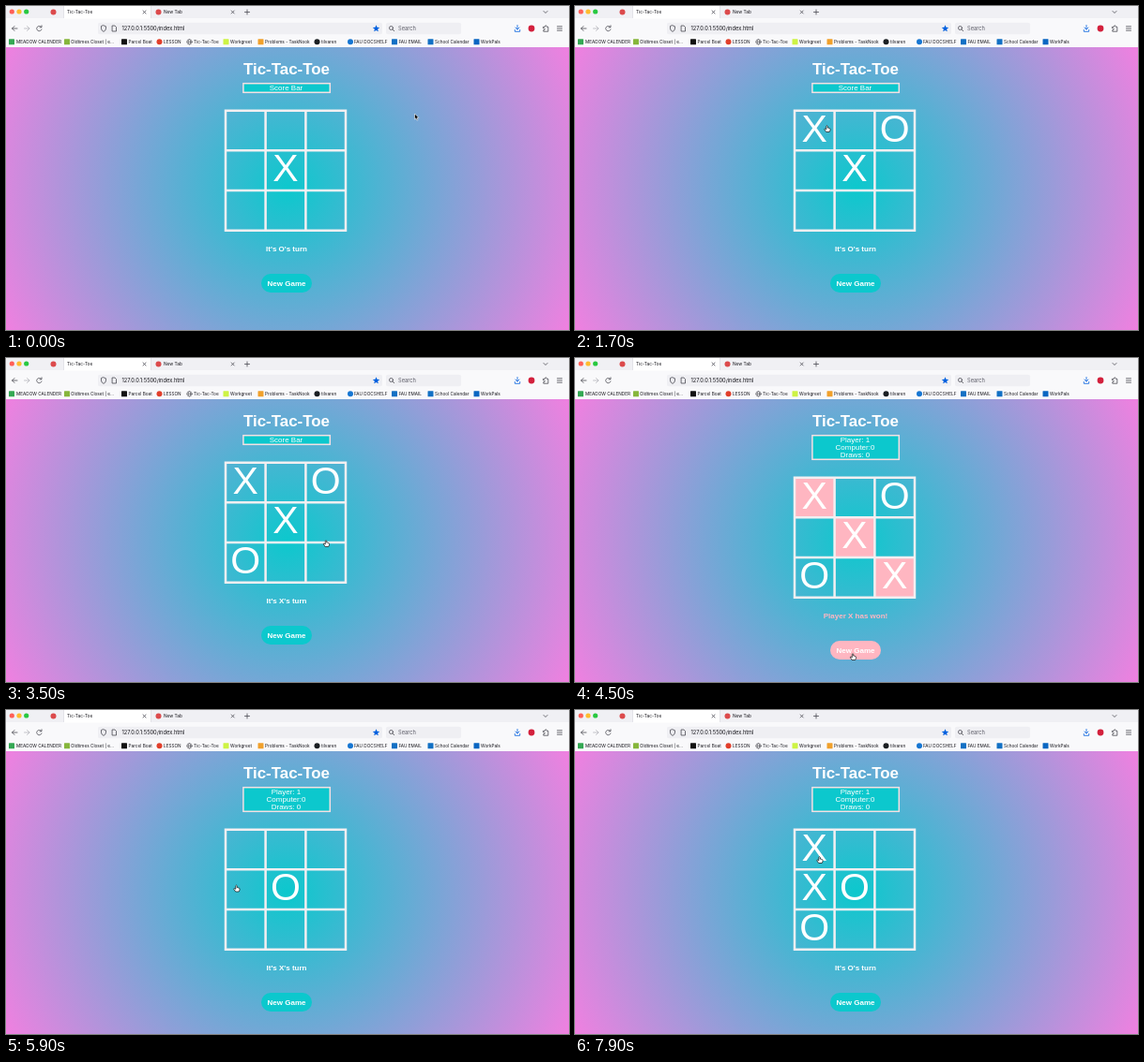
These frames come from a looping animation (600x346 px, 8 s). An HTML page:

```html
<!DOCTYPE html>
<html lang="en">
<head>
<meta charset="utf-8">
<title>Tic-Tac-Toe</title>
<style>
  html, body { margin: 0; width: 100%; height: 100%; overflow: hidden; }
  svg { display: block; width: 600px; height: 346px; }
  .ui { font-family: Inter, "Noto Sans", sans-serif; fill: #15141a; }
  .page { font-family: "Liberation Sans", Arial, sans-serif; fill: #fff; text-anchor: middle; }
  .bold { font-weight: 700; }
  .icon { fill: none; stroke: #4a4a52; stroke-width: .8; stroke-linecap: round; stroke-linejoin: round; }
  .mark { font-size: 41px; }
  .small { font-size: 8px; }
</style>
</head>
<body>
<svg viewBox="0 0 600 346">
  <defs>
    <radialGradient id="glow" gradientUnits="userSpaceOnUse" cx="300" cy="195" r="336">
      <stop offset="0" stop-color="#0cc8cd"/>
      <stop offset="1" stop-color="#f080e0"/>
    </radialGradient>
  </defs>

  <rect width="600" height="346" fill="url(#glow)"/>

  <!-- browser window -->
  <g class="ui">
    <rect width="600" height="13" fill="#f0f0f4"/>
    <rect y="13" width="600" height="31" fill="#f9f9fb"/>
    <rect x="61.5" y="0" width="93" height="13.5" fill="#fff"/>
    <path d="M61.5 0v13M154.5 0v13" stroke="#d5d5dc" stroke-width=".6"/>
    <circle cx="6.3" cy="6" r="2.6" fill="#ff5f57"/>
    <circle cx="14" cy="6" r="2.6" fill="#febc2e"/>
    <circle cx="21.7" cy="6" r="2.6" fill="#28c840"/>
    <circle cx="50.5" cy="6.5" r="3" fill="#dc4a4c"/>
    <circle cx="162.5" cy="6.5" r="3" fill="#dc4a4c"/>
    <g font-size="4.8">
      <text x="65" y="8.4">Tic-Tac-Toe</text>
      <text x="168" y="8.4">New Tab</text>
    </g>
    <g class="icon">
      <path d="M146 5l3 3m0-3l-3 3M240.200 5l3 3m0-3l-3 3M254.500 6.500h5m-2.500-2.500v5M573 5.500l2 2 2-2"/>
      <path d="M12 24H6.500m2.500-2.500L6.500 24l2.500 2.500"/>
      <path d="M19.500 24H25m-2.500-2.500L25 24l-2.500 2.500" stroke="#b4b4bb"/>
      <path d="M37.500 22.300A2.700 2.700 0 1 0 38 25M38 20.800v2h-2"/>
    </g>
    <g fill="#efeff3">
      <rect x="98" y="17.800" width="303" height="12.400" rx="2"/>
      <rect x="405" y="17.800" width="80" height="12.400" rx="2"/>
    </g>
    <g class="icon">
      <path d="M104 20.800l2.500 1v2.300q0 2-2.500 3.300-2.500-1.300-2.500-3.300v-2.300z"/>
      <path d="M113.500 21h2.500l1.500 1.500V27h-4z"/>
      <circle cx="410.500" cy="23.500" r="2"/>
      <path d="M412 25l1.700 1.700"/>
      <path d="M545 20.500v4.500m-2-2l2 2 2-2M542.300 25.500v1.800h5.400v-1.800" stroke="#0060df"/>
      <path d="M572.800 22.300h1.500q0-1.500 1-1.500t1 1.500h1.500v4.900h-5v-1.500q1.500 0 1.500-1t-1.500-1z"/>
      <path d="M587.500 21.800h5m-5 2.200h5m-5 2.200h5"/>
    </g>
    <path id="star" fill="#0060df"/>
    <circle cx="560" cy="24" r="3.400" fill="#d3203c"/>
    <text x="123.500" y="26.200" font-size="5.700">127.0.0.1:5500/index.html</text>
    <text x="418" y="26.200" font-size="5.700" fill="#5b5b66">Search</text>
    <g id="links" font-size="4.700"></g>
    <g class="icon" style="stroke-width:.55">
      <circle cx="195.500" cy="38.300" r="2.700"/>
      <ellipse cx="195.500" cy="38.300" rx="1.200" ry="2.700"/>
      <path d="M192.800 38.300h5.400"/>
    </g>
  </g>

  <!-- game -->
  <g class="page">
    <text class="bold" x="299" y="73.400" font-size="16.900">Tic-Tac-Toe</text>
    <rect id="bar" x="252.900" y="82.700" width="92.400" fill="#0cc8cd" stroke="#f5dfe2" stroke-width="1.500"/>
    <g id="score" class="small"></g>
    <g id="game">
      <g id="cells"></g>
      <path d="M234 111.700h128v128h-128zM276.600 111.700v128M319.400 111.700v128M234 154.300h128M234 197h128" fill="none" stroke="#f3eff1" stroke-width="2.500"/>
      <g id="marks"></g>
      <text id="status" class="bold small" x="299" y="261.600"></text>
      <rect id="button" x="272" y="286" width="54" height="20" rx="10"/>
      <text class="bold small" x="299" y="298.700">New Game</text>
    </g>
  </g>

  <g id="pointer" stroke-linejoin="round">
    <path id="arrow" d="M0 0v6l1.400-1.200 1 2.300 1.100-.5-1-2.200h1.900z" fill="#000" stroke="#fff" stroke-width=".6"/>
    <path id="hand" d="M-.7.700Q0-.5.700.700V2.600q1.200-.3 1.500.4 1.300-.1 1.300 1V5.200L2.700 7H-.8L-2.500 4.600q-.5-1.200.5-1.100l1.300.8z" fill="#fff" stroke="#111" stroke-width=".7"/>
  </g>
</svg>

<script>
const LOOP = 8000, STEP = 100;
const PINK = '#ffb6c1', TEAL = '#0cc8cd';
const NS = 'http://www.w3.org/2000/svg';
const $ = id => document.getElementById(id);

function add(parent, tag, attrs, text = '') {
  const el = document.createElementNS(NS, tag);
  for (const key in attrs) el.setAttribute(key, attrs[key]);
  el.textContent = text;
  parent.append(el);
  return el;
}

const starPoints = Array.from({ length: 10 }, (_, i) => {
  const r = i % 2 ? 1.7 : 3.9, a = i * Math.PI / 5;
  return `${394.5 + r * Math.sin(a)} ${24.2 - r * Math.cos(a)}`;
});
$('star').setAttribute('d', `M${starPoints.join('L')}z`);

// icon centre, text start, label, icon colour, round icon
const links = [
  [6, 11, 'MEADOW CALENDER', '#34a853'],
  [65, 69, 'Oldtimes Closet | e…', '#86b63c'],
  [126, 130.5, 'Parcel Boat', '#111'],
  [163.500, 168, 'LESSON', '#e13f2b', true],
  [195.500, 200, 'Tic-Tac-Toe'],
  [234.500, 239, 'Workgreet', '#cdf344'],
  [271.500, 276, 'Problems - TaskNook', '#f0a02c'],
  [331.500, 336, 'tilvaren', '#1b1f23', true],
  [367, 371, 'FAU DOCSHELF', '#1676d2', true],
  [414, 418.500, 'FAU EMAIL', '#1270c4'],
  [452.500, 457, 'School Calendar', '#1270c4'],
  [501.500, 506, 'WorkPals', '#0a66c2']
];
for (const [cx, x, label, fill, round] of links) {
  if (fill) add($('links'), 'rect', { x: cx - 3, y: 35.3, width: 6, height: 6, rx: round ? 3 : .5, fill });
  add($('links'), 'text', { x, y: 40 }, label);
}

const cells = [], marks = [];
for (let i = 0; i < 9; i++) {
  const col = i % 3, row = Math.floor(i / 3);
  cells.push(add($('cells'), 'rect', { x: 234 + col * 42.7, y: 111.7 + row * 42.7, width: 42.7, height: 42.7, fill: PINK }));
  marks.push(add($('marks'), 'text', { class: 'mark', x: 255.2 + col * 42.8, y: 144.7 + row * 42.7 }));
}
const scoreLines = [0, 1, 2].map(i => add($('score'), 'text', { x: 298.5, y: 89.9 + i * 8 }));

// start time, board, status
const states = [
  [0, '....X....', "It's O's turn"],
  [700, '..O.X....', "It's X's turn"],
  [1600, 'X.O.X....', "It's O's turn"],
  [2500, 'X.O.X.O..', "It's X's turn"],
  [3800, 'X.O.X.O.X', 'Player X has won!'],
  [4700, '.........', "It's O's turn"],
  [5500, '....O....', "It's X's turn"],
  [6100, '...XO....', "It's O's turn"],
  [6900, '...XO.O..', "It's X's turn"],
  [7600, 'X..XO.O..', "It's O's turn"]
];
const WIN_TIME = 3800, WIN_LINE = [0, 4, 8];

// time, x, y of the pointer tip
const path = [
  [0, 435.5, 115], [500, 435.5, 115], [1200, 268.5, 127.5], [2700, 268.5, 127.5],
  [3400, 341, 194.5], [3900, 341, 194.5], [4400, 296, 315.5], [5000, 296, 315.5],
  [5700, 245.5, 187], [6500, 245.5, 187], [7000, 260.5, 156.5], [LOOP, 260.5, 156.5]
];

function pointerAt(t) {
  const i = path.findIndex(p => p[0] > t);
  const [t0, x0, y0] = path[i - 1], [t1, x1, y1] = path[i];
  const u = (t - t0) / (t1 - t0), k = u * u * (3 - 2 * u);
  return [x0 + (x1 - x0) * k, y0 + (y1 - y0) * k];
}

const show = (el, on) => el.setAttribute('visibility', on ? 'visible' : 'hidden');

function draw(t) {
  const [, board, status] = states.findLast(s => s[0] <= t);
  const scored = t >= WIN_TIME, won = status.startsWith('Player');
  const drop = scored ? 16 : 0;
  const [x, y] = pointerAt(t);
  const inside = (x0, y0, w, h) => x >= x0 && x <= x0 + w && y >= y0 + drop && y <= y0 + drop + h;
  const onButton = inside(272, 286, 54, 20);
  const onBoard = inside(233, 110.5, 130, 130);

  marks.forEach((m, i) => m.textContent = board[i] === '.' ? '' : board[i]);
  cells.forEach((c, i) => show(c, won && WIN_LINE.includes(i)));
  $('status').textContent = status;
  $('status').setAttribute('fill', won ? PINK : '#fff');
  $('button').setAttribute('fill', onButton ? PINK : TEAL);
  $('game').setAttribute('transform', `translate(0 ${drop})`);
  $('bar').setAttribute('height', 9.6 + drop);
  const lines = scored ? ['Player: 1', 'Computer:0', 'Draws: 0'] : ['Score Bar'];
  scoreLines.forEach((line, i) => line.textContent = lines[i] || '');

  $('pointer').setAttribute('transform', `translate(${x} ${y})`);
  show($('hand'), onButton || onBoard);
  show($('arrow'), !onButton && !onBoard);
}

const start = performance.now();
function tick() {
  const t = (performance.now() - start) % LOOP;
  draw(Math.floor(t / STEP) * STEP);
  requestAnimationFrame(tick);
}
tick();
</script>
</body>
</html>
```
